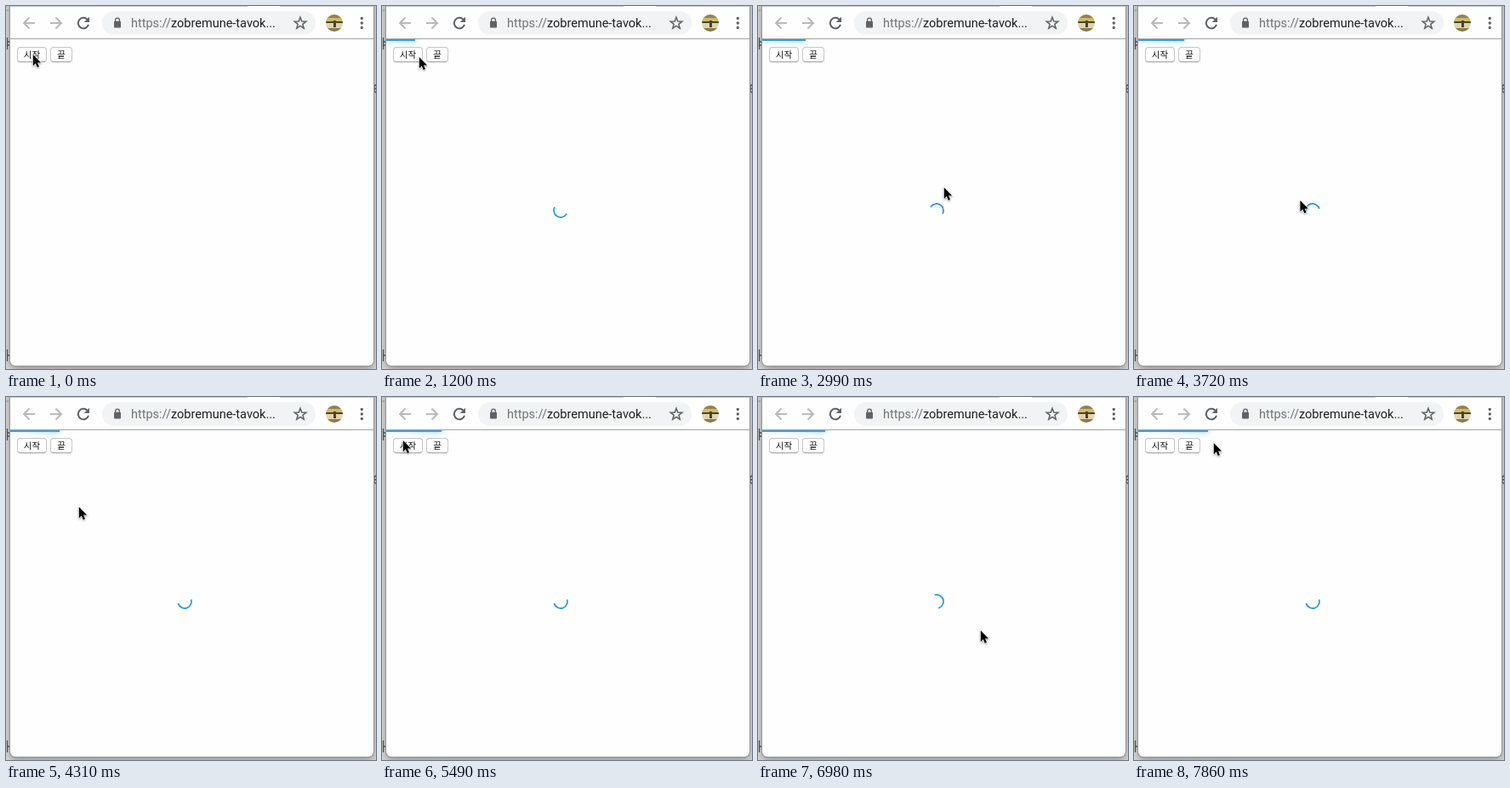
Animation of 435x426 px, one loop 8000 ms. Source, as an HTML page:

```html
<!DOCTYPE html>
<html lang="ko">
<head>
<meta charset="utf-8">
<title>Progress bar</title>
<style>
  :root { --accent: #3c9fde; --icon: #5f6368; --off: #b8babd; }
  html, body { margin: 0; width: 100%; height: 100%; overflow: hidden; background: #d6d6d6; }
  #stage { position: absolute; left: 0; top: 0; width: 435px; height: 426px; overflow: hidden; }
  .window {
    position: absolute; left: 5px; top: -20px; width: 427px; height: 442px;
    background: #fefefe; border-radius: 0 0 6px 6px;
    box-shadow: 0 0 0 1px #9a9a9a, 0 3px 8px rgba(0, 0, 0, .38);
  }
  svg { position: absolute; left: 0; top: 0; width: 435px; height: 426px; fill: none; }
  .url { font: 14.5px Roboto, Arial, sans-serif; fill: #202124; }
  .scheme { fill: #70757a; }
  .button {
    position: absolute; top: 48px; height: 18px; box-sizing: border-box;
    border: 1px solid #c6c6c6; border-bottom-color: #a6a6a6; border-radius: 4px;
    background: #fff; box-shadow: 0 .5px .5px rgba(0, 0, 0, .12);
    font: 10.5px/16px "Noto Sans CJK KR", "Noto Sans CJK", sans-serif;
    color: #111; text-align: center; white-space: nowrap;
  }
  .page { position: absolute; left: 5px; top: 39px; width: 427px; height: 383px; overflow: hidden; }
  #bar { position: absolute; left: 0; top: 0; height: 2px; background: var(--accent); }
  .peg {
    position: absolute; right: 0; width: 100px; height: 100%;
    box-shadow: 0 0 10px var(--accent), 0 0 5px var(--accent);
    transform: rotate(3deg) translate(0, -4px);
  }
  #spinner {
    position: absolute; left: 196px; top: 192px; width: 18px; height: 18px;
    box-sizing: border-box; border: 2px solid transparent;
    border-top-color: var(--accent); border-left-color: var(--accent); border-radius: 50%;
  }
  #cursor { filter: drop-shadow(0 1px 1px rgba(0, 0, 0, .35)); }
</style>
</head>
<body>
<div id="stage">
  <svg stroke="#555" stroke-width="1.3">
    <path d="M1.5 37V51M1.5 42H5M1.5 46H5M1.5 403V417M1.5 410H5"/>
    <path d="M0 5H3" stroke="#aaa"/>
    <path d="M435 92.5Q432.6 93 432.6 97T435 101.5M432.6 97H435"/>
  </svg>
  <div class="window"></div>
  <svg>
    <path d="M5 .5H284M322 .5H432" stroke="#c9cbce"/>
    <path d="M5 38.5H432" stroke="#a3a3a3"/>
    <g stroke-width="2">
      <path d="M34 20H21.5M27.5 13.5L21 20L27.5 26.5" stroke="var(--off)"/>
      <path d="M52 20H64.5M58.5 13.5L65 20L58.5 26.5" stroke="var(--off)"/>
      <path d="M95.6 15.8A6.2 6.2 0 1 0 97 21.8" stroke="var(--icon)"/>
    </g>
    <path d="M98 12.8V19H91.8Z" fill="var(--icon)"/>
    <rect x="113" y="6" width="251" height="28" rx="14" fill="#f1f3f4"/>
    <rect x="127" y="17.8" width="8" height="7.6" rx="1" fill="var(--icon)"/>
    <path d="M128.6 18V16.6A2.4 2.4 0 0 1 133.4 16.6V18" stroke="var(--icon)" stroke-width="1.3"/>
    <text class="url" x="147" y="25"><tspan class="scheme">https://</tspan>zobremune-tavok...</text>
    <path id="star" stroke="var(--icon)" stroke-width="1.5"/>
    <clipPath id="round"><circle cx="386" cy="20" r="10"/></clipPath>
    <g clip-path="url(#round)">
      <path d="M376 10H396V30H376Z" fill="#ded4ae"/>
      <path d="M376 10H396V14H376Z" fill="#8f8350"/>
      <path d="M376 14H396V18H376Z" fill="#cfba68"/>
      <path d="M376 18H396V20H376ZM385 17H388V25H385Z" fill="#4a432f"/>
      <path d="M376 26H396V30H376Z" fill="#8a7c4a"/>
    </g>
    <path d="M418.3 14.5V26" stroke="var(--icon)" stroke-width="3.4"
      stroke-linecap="round" stroke-dasharray="0 5.5"/>
  </svg>
  <div class="button" style="left:13px;width:35px">시작</div>
  <div class="button" style="left:52px;width:26px">끝</div>
  <div class="page">
    <div id="bar"><div class="peg"></div></div>
    <div id="spinner"></div>
  </div>
  <svg>
    <g id="cursor">
      <path transform="translate(.8 1) scale(.9)" d="M0 0V14.6L3.3 11.5L5.5 16.6L8 15.5L5.8 10.5H10.4Z"
        fill="#000" stroke="#fff" stroke-width="1.4" paint-order="stroke"/>
    </g>
  </svg>
</div>
<script>
const LOOP = 8000, TICKS = 54;          // the picture moves on in even ticks
const TICK = 150, CLICK = 550;          // page time per tick, time of the click
const TRICKLE = 800, EASE = 200, SPIN = 400;
const $ = id => document.getElementById(id);
const bar = $('bar'), spinner = $('spinner'), cursor = $('cursor');

// Turning points of the pointer: [tick, x, y]
const turns = [[0, 31, 56], [8, 43, 59], [20, 218, 212], [24, 222, 252],
  [29, 85, 128], [37, 24, 50], [39, 80, 22], [47, 261, 273], [53, 93, 53]];

const mix = (a, b, p) => a + (b - a) * p;

function pointer(tick) {
  const i = Math.max(1, turns.findIndex(t => t[0] >= tick));
  const [t0, x0, y0] = turns[i - 1], [t1, x1, y1] = turns[i];
  const p = (tick - t0) / (t1 - t0);
  return [mix(x0, x1, p), mix(y0, y1, p)];
}

// Width after n trickles: a steady climb with a slow wobble
function level(n) {
  if (n < 0) return 0;
  const a = n * Math.PI / 9;
  return 34 + 5.33 * n + 3.2 * Math.sin(2 * a) + 1.5 * Math.sin(a);
}

function barWidth(ms) {
  const n = Math.floor(ms / TRICKLE);
  const p = Math.min(1, ms % TRICKLE / EASE);
  return mix(level(n - 1), level(n), 1 - (1 - p) ** 2.2);
}

function draw(now) {
  const tick = Math.floor(now % LOOP / LOOP * TICKS);
  const ms = tick * TICK - CLICK;
  cursor.setAttribute('transform', `translate(${pointer(tick)})`);
  bar.style.display = spinner.style.display = ms < 0 ? 'none' : 'block';
  if (ms < 0) return;
  bar.style.width = barWidth(ms) + 'px';
  spinner.style.transform = `rotate(${ms / SPIN * 360 + 29}deg)`;
}

const corners = Array.from({ length: 10 }, (_, i) => {
  const r = i % 2 ? 3 : 7.2, a = i * Math.PI / 5 - Math.PI / 2;
  return `${346 + r * Math.cos(a)} ${20.4 + r * Math.sin(a)}`;
});
$('star').setAttribute('d', `M${corners.join('L')}Z`);

const start = performance.now();
function loop() {
  draw(performance.now() - start);
  requestAnimationFrame(loop);
}
loop();
</script>
</body>
</html>
```
